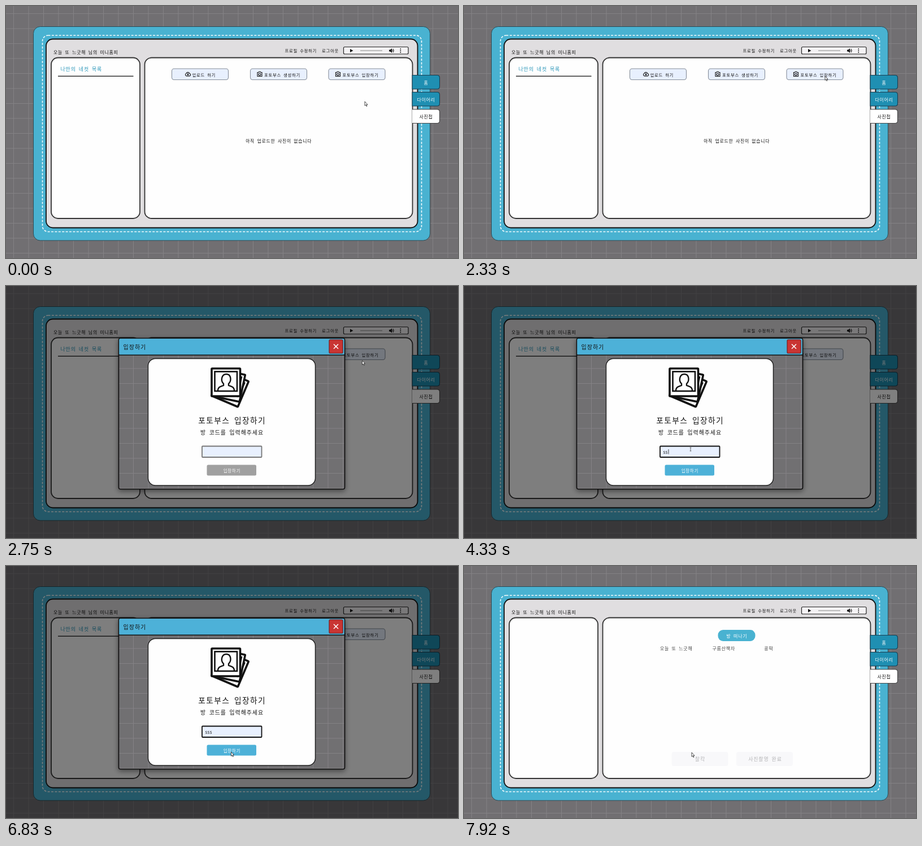
Animation, 800 px wide and 446 px high, one loop 8 s. Source, as an HTML page:

```html
<!DOCTYPE html>
<html lang="ko">
<head>
<meta charset="utf-8">
<title>포토부스</title>
<style>
html, body { margin: 0; width: 100%; height: 100%; overflow: hidden; background: #716f72; }
svg { display: block; width: 100vw; height: 100vh; }
text {
  font-family: "Noto Sans CJK KR", "Noto Sans CJK JP", "Noto Sans CJK", sans-serif;
  font-weight: 500; letter-spacing: .1em; word-spacing: .186em; dominant-baseline: central;
}
</style>
</head>
<body>
<svg id="stage" viewBox="0 0 800 446">
  <defs>
    <pattern id="grid" width="26.5" height="26.5" x="13" y="13" patternUnits="userSpaceOnUse">
      <rect width="26.5" height="26.5" fill="#716f72"/>
      <path d="M.5 0V26.5M0 .5H26.5" stroke="#848285"/>
    </pattern>
    <filter id="shadow" x="-10%" y="-10%" width="120%" height="125%">
      <feDropShadow dx="0" dy="3" stdDeviation="5" flood-opacity=".45"/>
    </filter>
    <g id="camera" fill="none" stroke="#111" stroke-width="1.1">
      <path d="M-4 -3H-2L-1.2 -4.2H1.2L2 -3H4V4H-4Z"/>
      <circle cy=".5" r="2"/>
    </g>
    <g id="cloud" fill="none" stroke="#111" stroke-width="1.1">
      <path d="M-2.6 3.4A2.4 2.4 0 0 1 -3 -1.2A3.2 3.2 0 0 1 3 -.9A2.2 2.2 0 0 1 3 3.4Z"/>
      <path d="M0 2.6V-.6M-1.6 .9L0 -.8L1.6 .9"/>
    </g>
  </defs>
  <g id="page"></g>
  <g id="album"></g>
  <g id="booth"></g>
  <rect id="dim" width="800" height="446"/>
  <g id="modal"></g>
  <path id="arrow" d="M0 0V7.4L1.7 5.9L2.9 8.6L4 8.1L2.9 5.5H5Z" fill="#fff" stroke="#222" stroke-width=".8"/>
  <path id="beam" d="M-1.3 -3H1.3M0 -3V3M-1.3 3H1.3" fill="none" stroke="#444" stroke-width=".8"/>
</svg>
<script>
const LOOP = 8000, STEP = 1000 / 12;
const BLUE = '#49b2d1', INK = '#222', FIELD = '#e8f0fe';
const el = id => document.getElementById(id);
const set = (id, attrs) => { for (const k in attrs) el(id).setAttribute(k, attrs[k]); };
const show = (id, on) => set(id, { visibility: on ? 'visible' : 'hidden' });

const box = (x, y, x2, y2, r, fill, stroke = 'none', w = 1, more = '') =>
  `<rect x="${x}" y="${y}" width="${x2 - x}" height="${y2 - y}" rx="${r}" fill="${fill}" stroke="${stroke}" stroke-width="${w}" ${more}/>`;
const line = (d, stroke, w, more = '') =>
  `<path d="${d}" fill="none" stroke="${stroke}" stroke-width="${w}" ${more}/>`;
// cell is the advance of one Hangul syllable
const label = (x, y, cell, str, fill = '#111', anchor = 'start', weight = 500) =>
  `<text x="${x}" y="${y}" font-size="${(cell * .98).toFixed(2)}" fill="${fill}" text-anchor="${anchor}" font-weight="${weight}">${str}</text>`;
const mid = (x, y, cell, str, fill, weight) => label(x + cell * .05, y, cell, str, fill, 'middle', weight);

const tab = (y, str, on) => {
  const edge = `M719 ${y}H763Q767.5 ${y} 767.5 ${y + 4.5}V${y + 20}Q767.5 ${y + 24.5} 763 ${y + 24.5}H719`;
  return `<path d="${edge}Z" fill="${on ? '#fff' : '#1f8fb2'}"/>` +
    line(on ? edge : edge + 'Z', on ? '#444' : '#173f52', 1.1) +
    mid(743, y + 12.5, 8, str, on ? '#111' : '#fff');
};

const pageArt = () =>
  box(0, 0, 800, 446, 0, 'url(#grid)') +
  box(48.5, 36.5, 750.5, 415, 12, BLUE, '#2c4a55') +
  box(64.5, 52, 735.5, 399.5, 10, 'none', '#f4fbfd', 1.6, 'stroke-dasharray="4 2.4"') +
  box(71, 58.5, 728.5, 392.5, 12, '#e0dee0', '#111', 1.8) +
  box(80, 91.5, 237, 376, 12, '#fefefe', '#333', 1.8) +
  box(245.5, 91.5, 719.5, 376, 12, '#fefefe', '#333', 1.8) +
  label(84, 81.5, 8.07, '오늘 또 느긋해 님의 미니홈피') +
  label(493.5, 78.7, 7.5, '프로필 수정하기') +
  label(559, 78.7, 7.5, '로그아웃') +
  box(597.5, 72.5, 712, 85, 2, '#f4f2f4', INK, 1.2) +
  '<path d="M609 76L614.5 79L609 82ZM678 77.5H680L683 75V83L680 80.5H678Z" fill="#111"/>' +
  line('M684 77.2Q685.4 79 684 80.8M685 75.6Q687.8 79 685 82.4', '#111', .9) +
  line('M627 79H666', '#aaa', 1.6) +
  [76, 79, 82].map(y => `<circle cx="698.3" cy="${y}" r=".9" fill="#111"/>`).join('') +
  tab(122.5, '홈') + tab(152.5, '다이어리') + tab(183, '사진첩', true);

const action = (x, icon, iconX, str, textX) =>
  box(x, 111, x + 100, 130.5, 4, FIELD, '#858d99', 1.1) +
  `<use href="#${icon}" x="${iconX}" y="120.5"/>` + label(textX, 121, 7.5, str);

const albumArt = () =>
  label(96.5, 111.7, 9.1, '나만의 네컷 목록', '#2b96b9') +
  line('M92 124.3H225.5', '#333', 1.4) +
  action(293.5, 'cloud', 322, '업로드 하기', 329.5) +
  action(432.5, 'camera', 449, '포토부스 생성하기', 457) +
  action(571, 'camera', 587.5, '포토부스 입장하기', 595.5) +
  mid(482.3, 238.8, 8, '아직 업로드한 사진이 없습니다');

const boothArt = () =>
  box(449.5, 113, 515.5, 133, 9, BLUE) +
  mid(482.5, 123.3, 8.2, '방 떠나기', '#fff', 700) +
  mid(375.3, 145, 8.1, '오늘 또 느긋해', '#444') +
  mid(459.3, 145, 8.1, '구름산책자', '#444') +
  mid(539, 145, 8.1, '콩떡', '#444') +
  box(367.5, 329, 467.5, 354, 4, '#f8f8fa') +
  box(482, 329, 582, 354, 4, '#f8f8fa') +
  mid(417.5, 341.7, 9.1, '찰칵', '#b4b4b6') +
  mid(532.5, 341.7, 9.1, '사진촬영 완료', '#b4b4b6');

const polaroid = turn =>
  `<g transform="rotate(${turn} 366 194)">` + box(364, 146, 414.5, 195, 1, '#fff', '#111', 3.6) +
  box(369.5, 151.5, 409, 186, 0, '#fff', '#111', 2.6) + '</g>';

const modalArt = () =>
  box(199.5, 92.5, 599.5, 359.5, 3, 'url(#grid)', '#111', 1.6, 'filter="url(#shadow)"') +
  box(200.3, 93.3, 598.7, 122, 2, '#4db1d8') +
  line('M199.5 122.3H599.5', '#111', 1.5) +
  label(207.5, 107.3, 10.2, '입장하기') +
  box(572, 95, 596, 119, 2, '#c93533', '#7b1f1f', 1.2) +
  line('M580 103L588 111M588 103L580 111', '#fff', 1.5) +
  box(251.5, 128.5, 547.5, 353, 13, '#fefefe', INK, 1.5) +
  polaroid(23) + polaroid(12) + polaroid(0) +
  line('M375 186C375 178 380 178 385 176V173C379 167 382 156 390 156C398 156 400 167 394 173V176C399 178 404 178 404 186', '#111', 2.4) +
  mid(399.5, 237.3, 14, '포토부스 입장하기') +
  mid(399.5, 259, 10.1, '방 코드를 입력해주세요') +
  box(347, 283.5, 452.5, 303, 1, FIELD, '#777', 1.8, 'id="field"') +
  '<text id="code" x="352.5" y="293.3" font-size="8" fill="#111" style="letter-spacing:.04em"></text>' +
  '<path id="caret" d="M0 289V297.5" stroke="#111" stroke-width=".8"/>' +
  box(355.5, 316.5, 443, 335.5, 2.5, '#a0a0a0', 'none', 1, 'id="enter"') +
  mid(399.5, 326.3, 7.6, '입장하기', '#fff');

el('page').innerHTML = pageArt();
el('album').innerHTML = albumArt();
el('booth').innerHTML = boothArt();
el('modal').innerHTML = modalArt();

// pointer stops: time, x, y
const path = [
  [0, 635, 169], [900, 635, 169], [2100, 639, 124], [2600, 639, 124], [2750, 630.5, 132],
  [3550, 401, 289], [5050, 401, 289], [5700, 398.5, 329], [7050, 398.5, 329], [7600, 403, 330], [LOOP, 403, 330]
];
const pointer = t => {
  const i = Math.max(1, path.findIndex(p => p[0] > t));
  const [t0, x0, y0] = path[i - 1], [t1, x1, y1] = path[i];
  const u = (t - t0) / (t1 - t0), e = u * u * (3 - 2 * u);
  return [x0 + (x1 - x0) * e, y0 + (y1 - y0) * e];
};

const OPEN = 2575, FOCUS = 3650, KEYS = [4080, 4240, 4490], CLOSE = 6990;

function draw(ms) {
  const t = Math.floor((ms + 5) / STEP) * STEP;
  const open = t >= OPEN && t < CLOSE;
  const alpha = open ? Math.min(1, .85 + (t - OPEN) / 1100) : 0;
  show('album', t < CLOSE);
  show('booth', t >= CLOSE);
  set('dim', { 'fill-opacity': alpha < 1 ? alpha * .48 : .5 });
  set('modal', { opacity: alpha });

  const typed = 's'.repeat(KEYS.filter(k => t >= k).length);
  const focus = t >= FOCUS && open;
  el('code').textContent = typed;
  set('field', { stroke: focus ? '#111' : '#777' });
  set('enter', { fill: typed ? '#4db1d8' : '#a0a0a0' });
  const lastKey = Math.max(FOCUS, ...KEYS.filter(k => t >= k));
  const blink = Math.floor((t - lastKey) / 500) % 2 === 0;
  show('caret', focus && blink && t < 6600);
  set('caret', { transform: `translate(${353 + typed.length * 4.5} 0)` });

  const [x, y] = pointer(t);
  const over = open && x > 347 && x < 453 && y > 283 && y < 303;
  show('arrow', !over);
  show('beam', over);
  set(over ? 'beam' : 'arrow', { transform: `translate(${x.toFixed(2)} ${y.toFixed(2)})` });
}

function tick() {
  draw(performance.now() % LOOP);
  requestAnimationFrame(tick);
}
tick();
</script>
</body>
</html>
```
